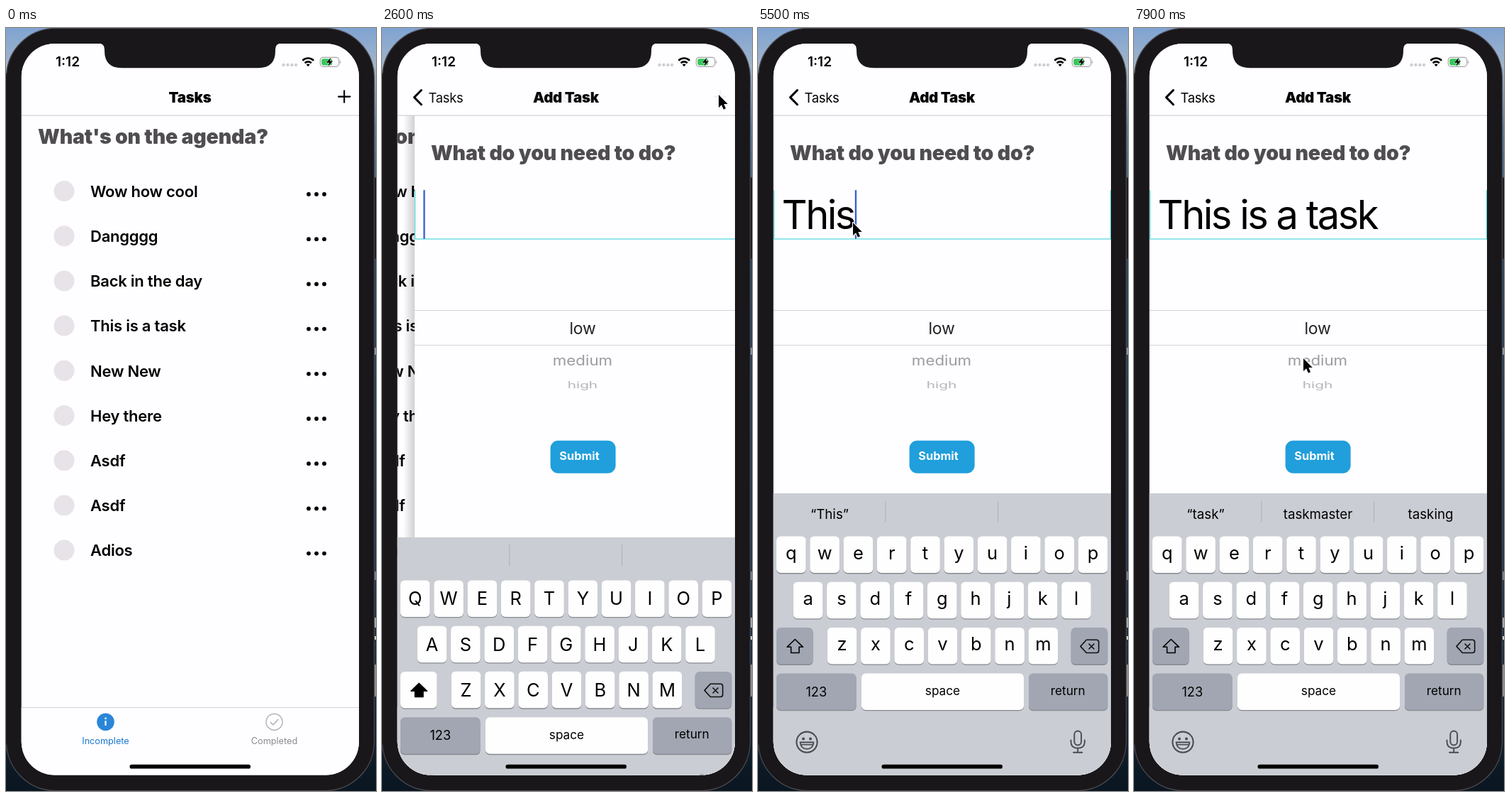
These frames come from a looping animation (522x1074 px, 8000 ms). An HTML page:

```html
<!DOCTYPE html>
<html lang="en">
<head>
<meta charset="utf-8">
<title>Task list</title>
<style>
html, body { margin: 0; width: 100%; height: 100%; overflow: hidden; background: #1a181b; }
svg { display: block; width: 522px; height: 1074px; font-family: Inter, Roboto, sans-serif; }
text { white-space: pre; }
.mid { text-anchor: middle; }
.head { font-weight: 900; font-size: 28.5px; letter-spacing: -.2px; fill: #4f4d50; }
.title { font-weight: 900; font-size: 20.5px; letter-spacing: -.3px; text-anchor: middle; }
.item { font-weight: 600; font-size: 22px; letter-spacing: -.24px; }
.tab { font-size: 12.7px; text-anchor: middle; }
.entry { font-size: 56px; letter-spacing: -2.5px; }
.key { font-size: 25.5px; text-anchor: middle; }
.word { font-size: 18.7px; text-anchor: middle; }
.wide { font-size: 17.2px; text-anchor: middle; }
.rule { stroke: #d3d2d6; stroke-width: 1.2; }
</style>
</head>
<body>
<svg id="stage" viewBox="0 0 522 1074" xmlns="http://www.w3.org/2000/svg"></svg>
<script>
const LOOP = 8000, STEP = 100, WIDTH = 476;
const tasks = ['Wow how cool', 'Dangggg', 'Back in the day', 'This is a task',
  'New New', 'Hey there', 'Asdf', 'Asdf', 'Adios'];
const phrase = 'This is a task';
const typed = [4700, 4900, 5100, 5300, 5600, 5800, 6000, 6200, 6400, 6500, 6700, 6800, 7000, 7200];
const hints = { ta: ['at', ''], task: ['taskmaster', 'tasking'] };
const pointer = [[900, 545, 330], [1500, 473, 94], [2000, 475, 94], [3500, 475, 94],
  [4300, 134, 274], [7200, 134, 274], [7800, 239, 465]];

const rect = (x, y, w, h, r, fill, extra = '') =>
  `<rect x="${x}" y="${y}" width="${w}" height="${h}" rx="${r}" fill="${fill}" ${extra}/>`;
const text = (x, y, s, cls, extra = '') => `<text x="${x}" y="${y}" class="${cls}" ${extra}>${s}</text>`;
const dot = (x, y, r, fill) => `<circle cx="${x}" cy="${y}" r="${r}" fill="${fill}"/>`;
const rule = y => `<path d="M22 ${y}H498" class="rule"/>`;
const stroke = (d, color, w, extra = '') =>
  `<path d="${d}" fill="none" stroke="${color}" stroke-width="${w}" stroke-linecap="round" stroke-linejoin="round" ${extra}/>`;

function backdrop() {
  return rect(0, 0, 522, 1074, 0, 'url(#sky)')
    + rect(519, 450, 3, 10, 0, '#8e979f') + rect(519, 765, 3, 12, 0, '#77828c')
    + rect(519, 830, 3, 14, 0, '#a9adb0') + rect(519, 856, 3, 5, 0, '#d5d5d3')
    + rect(519, 896, 3, 45, 0, '#8f8f8d')
    + rect(514, 210, 8, 115, 2, '#19171a')
    + rect(.5, .5, 519, 1073, 69, '#19171a', 'stroke="#4d4b50" stroke-width="1.2"')
    + rect(0, 64, 1.4, 945, 0, '#19171a');
}

function list() {
  const rows = tasks.map((name, i) => {
    const y = 229.5 + 63.2 * i;
    return dot(82, y, 14.5, '#e8e3e8') + text(119, y + 8.3, name, 'item')
      + [427, 438, 449].map(x => dot(x, y + 4.5, 2.9, '#000')).join('');
  });
  return text(45, 162.5, "What's on the agenda?", 'head') + rows.join('');
}

function form() {
  return rect(6, 123, 16, 930, 0, 'url(#edge)') + rect(22, 123, WIDTH, 930, 0, '#fefdff')
    + text(45, 185.5, 'What do you need to do?', 'head')
    + stroke('M22.6 229V297.1H497.4V229', '#6fdfe3', 1.5)
    + '<text id="entry" x="33.5" y="283" class="entry"></text>'
    + rect(0, 228, 2.3, 69, 1, '#3360cc', 'id="caret"')
    + rule(397.5) + rule(446.5)
    + text(259, 430.5, 'low', 'mid', 'font-size="23" letter-spacing="-.2" fill="#222"')
    + text(0, 0, 'medium', 'mid', 'font-size="22.3" fill="#9c9b9f" transform="translate(259 475) scale(1 .88)"')
    + text(0, 0, 'high', 'mid', 'font-size="20.8" fill="#b5b4b8" transform="translate(259 506.5) scale(1 .6)"')
    + rect(213.6, 580.8, 92, 46, 11, '#209fdc')
    + text(254.5, 608, 'Submit', 'mid', 'font-size="16.3" font-weight="700" fill="#fff"');
}

function navBar() {
  return rect(22, 22, WIDTH, 101, 0, '#fefdff') + rule(123.2)
    + `<g id="navOld">${text(259.5, 105, 'Tasks', 'title')}${stroke('M469 96.6H485.5M477.2 88.4V104.8', '#000', 2.1)}</g>`
    + `<g id="navNew">${text(259.5, 105, 'Add Task', 'title')}`
    + stroke('M55.5 87.5L45.5 97.6L55.5 107.7', '#000', 3)
    + text(65.5, 104.5, 'Tasks', '', 'font-size="18.5" letter-spacing="-.35"') + '</g>';
}

function statusBar() {
  return text(87, 54.3, '1:12', 'mid', 'font-size="19" font-weight="600"')
    + [391.4, 397.4, 403.4, 409].map(x => dot(x, 52, 2.2, '#cfced2')).join('')
    + '<g fill="none" stroke="#000" stroke-width="2.6"><path d="M418.3 45.8a11 11 0 0 1 15.8 0"/><path d="M421.6 49.3a6.4 6.4 0 0 1 9.2 0"/></g>'
    + '<path d="M426.2 54.3L423.7 51.6a3.6 3.6 0 0 1 5 0Z"/>'
    + rect(443.3, 41.3, 26.4, 13, 4, 'none', 'stroke="#a5a4a8" stroke-width="1.2"')
    + rect(445.2, 43.2, 15, 9.2, 2.3, '#35c759')
    + '<path d="M471 45.5a3 3 0 0 1 0 4.8Z" fill="#a5a4a8"/>'
    + '<path d="M458.5 41.5L451.7 48.8H456L454.4 54L461.2 46.6H456.9Z" stroke="#fff" stroke-width="1" paint-order="stroke"/>';
}

function tabBar() {
  return rect(21, 956, WIDTH + 1, 97, 0, '#fefdff') + rule(956.5)
    + dot(140.5, 976.8, 12.3, '#2a86d8')
    + dot(140.5, 971.8, 1.4, '#fff') + rect(139.4, 975, 2.2, 7, .8, '#fff')
    + text(140.5, 1008, 'Incomplete', 'tab', 'fill="#1b78cf"')
    + '<circle cx="378.5" cy="976.8" r="11.5" fill="none" stroke="#bcbbc0" stroke-width="1.7"/>'
    + stroke('M373.3 977.3L376.8 980.8L383.8 973.3', '#bcbbc0', 1.8)
    + text(378.5, 1008, 'Completed', 'tab', 'fill="#8b8a8f"');
}

const cap = (x, y, w, fill, extra = '') =>
  rect(x, y + 1.4, w, 51.5, 6, '#888a8f') + rect(x, y, w, 51.5, 6, fill, extra);

function keyboard() {
  const grey = '#a1a6b2', white = '#fefefe';
  const rows = [['QWERTYUIOP', 26], ['ASDFGHJKL', 49.8], ['ZXCVBNM', 97.8]];
  const keys = rows.map(([row, x0], r) => [...row].map((c, i) => {
    const x = x0 + 47.3 * i, y = 715.5 + 64.2 * r;
    return cap(x, y, 41.6, white) + text(x + 20.8, y + 35, c, 'key', `data-y="${y + 35}"`);
  }).join('')).join('');
  return rect(21, 655, WIDTH + 1, 400, 0, '#cacdd3')
    + rect(180, 661, 159, 45, 5, '#e7e8eb', 'id="pick"')
    + stroke('M179.8 666V695', '#b1b4ba', 1.2, 'id="bar1"') + stroke('M338.5 666V695', '#b1b4ba', 1.2, 'id="bar2"')
    + [101, 259.5, 418.5].map((x, i) => text(x, 691, '', 'word', `id="word${i}"`)).join('')
    + keys
    + cap(26, 844, 51.6, white, 'id="shift"')
    + '<path id="arrow" d="M52.3 860.5L63.5 871.3H58V879.5H46.6V871.3H41Z" stroke="#000" stroke-width="1.6" stroke-linejoin="round"/>'
    + cap(441.7, 844, 51.6, grey)
    + stroke('M463.3 861.3H477.5Q480.7 861.3 480.7 864.5V876.3Q480.7 879.5 477.5 879.5H463.3L455 870.4ZM467 867L474 874M474 867L467 874', '#111', 1.6)
    + cap(26, 908.4, 112.5, grey) + text(82.3, 940.5, '123', 'wide', 'style="font-size:18.2px"')
    + cap(146, 908.4, 229, white) + text(260.5, 939, 'space', 'wide')
    + cap(382, 908.4, 111.3, grey) + text(437.3, 938.5, 'return', 'wide')
    + '<circle cx="69" cy="1005.2" r="14.6" fill="none" stroke="#494b50" stroke-width="2.1"/>'
    + dot(64, 1000.5, 2, '#494b50') + dot(74, 1000.5, 2, '#494b50')
    + '<path d="M59.5 1005.5H78.5Q77.5 1014.8 69 1014.8Q60.5 1014.8 59.5 1005.5Z" fill="none" stroke="#494b50" stroke-width="1.8" stroke-linejoin="round"/>'
    + stroke('M61 1008.8H77', '#494b50', 1.5)
    + rect(446.3, 989.5, 9.8, 20, 4.9, 'none', 'stroke="#494b50" stroke-width="1.9"')
    + stroke('M441.5 1002.5V1005Q441.5 1013.7 451.2 1013.7Q460.9 1013.7 460.9 1005V1002.5M451.2 1013.7V1019.5M445 1019.7H457.4', '#494b50', 1.9);
}

const stage = document.getElementById('stage');
stage.innerHTML = `<defs>
  <linearGradient id="sky" x2="0" y2="1">
    <stop offset="0" stop-color="#7fa3d2"/><stop offset=".05" stop-color="#a3b5c9"/>
    <stop offset=".13" stop-color="#5f7c97"/><stop offset=".3" stop-color="#28445e"/>
    <stop offset=".75" stop-color="#1b3449"/><stop offset="1" stop-color="#0a1621"/>
  </linearGradient>
  <linearGradient id="edge"><stop offset="0" stop-opacity="0"/><stop offset="1" stop-opacity=".18"/></linearGradient>
  <clipPath id="screen"><rect x="21.7" y="22" width="476.3" height="1029.5" rx="47"/></clipPath>
</defs>
${backdrop()}
<g clip-path="url(#screen)">
  ${rect(21, 22, 478, 1031, 0, '#fefdff')}
  <g id="list">${list()}</g>
  <g id="form">${form()}</g>
  ${navBar()}${tabBar()}
  <g id="keyboard">${keyboard()}</g>
  ${statusBar()}
  ${rect(174.5, 1036.8, 170.5, 5.7, 2.85, '#000')}
</g>
<path d="M131 21.5Q139 22 139 30V32Q139 56.2 163 56.2H356Q380 56.2 380 32V30Q380 22 388 21.5Z" fill="#19171a"/>
<g id="pointer"><path d="M.6 2V19.4L4.7 15.6L7.4 22L10.8 20.5L8.1 14.3H13.6Z" fill="#000" opacity=".22"/>
<path d="M0 0V18L4.1 14.2L6.8 20.6L10 19.2L7.3 13H12.8Z" stroke="#fff" stroke-width="2.2" paint-order="stroke" stroke-linejoin="round"/></g>`;

const el = {};
stage.querySelectorAll('[id]').forEach(n => el[n.id] = n);
const letters = [...stage.querySelectorAll('.key')];

const clamp = v => Math.min(1, Math.max(0, v));
const ease = u => u < .5 ? 2 * u * u : 1 - 2 * (1 - u) ** 2;
const span = (t, a, b) => ease(clamp((t - a) / (b - a)));
const move = (node, x, y) => node.setAttribute('transform', `translate(${x} ${y})`);
const show = (node, v) => node.setAttribute('opacity', +v);

function pointerAt(t) {
  let [, x, y] = pointer[0];
  for (let i = 1; i < pointer.length; i++) {
    const [a] = pointer[i - 1], [b, bx, by] = pointer[i], p = span(t, a, b);
    x += (bx - x) * p;
    y += (by - y) * p;
  }
  return [x, y];
}

function blink(ms) {
  const u = ms % 1200;
  return u < 700 ? clamp((700 - u) / 200) : clamp((u - 1050) / 150);
}

function draw(t) {
  const push = span(t, 2070, 2700), rise = span(t, 2342, 2700);
  move(el.list, -.3 * WIDTH * push, 0);
  move(el.form, WIDTH * (1 - push), 0);
  show(el.list, push < 1);
  show(el.form, push > 0);
  show(el.navOld, 1 - push);
  show(el.navNew, push);
  move(el.keyboard, 0, 397 * (1 - rise));
  show(el.keyboard, rise > 0);

  const count = typed.filter(k => k <= t).length;
  const value = phrase.slice(0, count);
  el.entry.textContent = value;
  el.caret.setAttribute('x', 34.4 + (count ? el.entry.getComputedTextLength() : 0));
  show(el.caret, blink(t - (count ? typed[count - 1] : 2400)));

  const upper = count === 0;
  for (const n of letters) {
    const c = n.textContent;
    n.textContent = upper ? c.toUpperCase() : c.toLowerCase();
    n.setAttribute('y', n.dataset.y - (upper ? 0 : 2.5));
  }
  el.shift.setAttribute('fill', upper ? '#fefefe' : '#a1a6b2');
  el.arrow.setAttribute('fill', upper ? '#000' : 'none');

  const word = value.split(' ').pop();
  const [second, third] = hints[word] || ['', ''];
  el.word0.textContent = word && `“${word}”`;
  el.word1.textContent = second;
  el.word2.textContent = third;
  const picked = word === 'ta';
  show(el.pick, picked);
  show(el.bar1, !picked);
  show(el.bar2, !picked);

  move(el.pointer, ...pointerAt(t));
}

function tick() {
  draw(Math.floor(performance.now() % LOOP / STEP) * STEP);
  requestAnimationFrame(tick);
}
tick();
</script>
</body>
</html>
```
